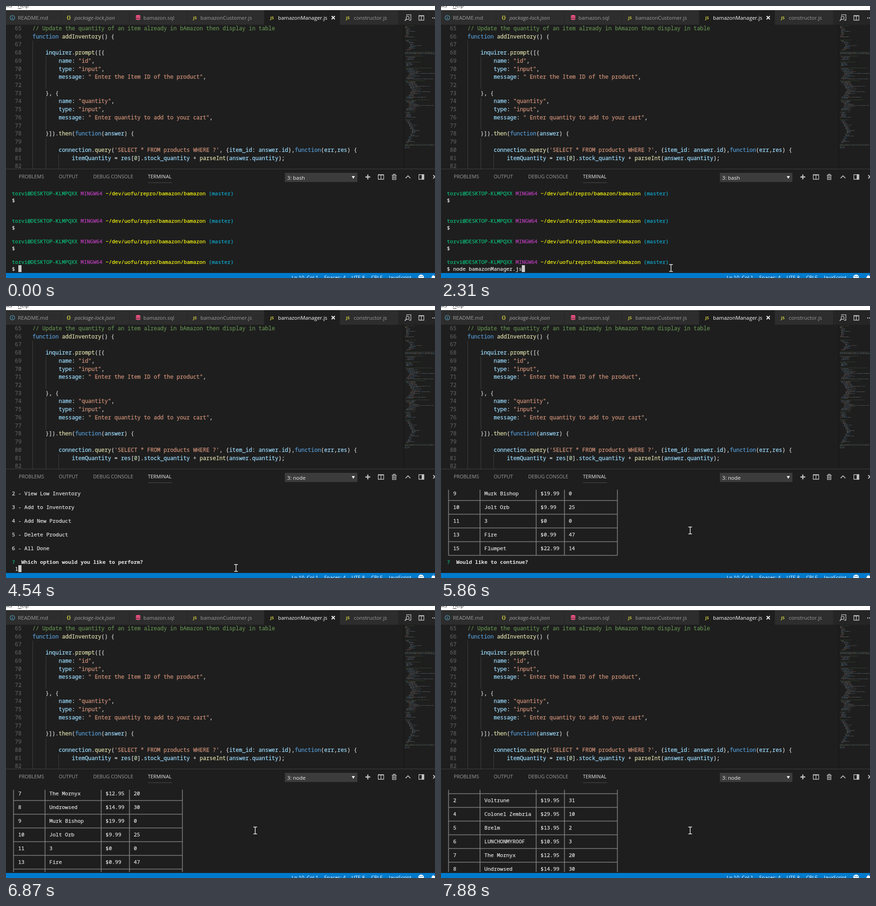
Recreate the animation shown at these times as an HTML page with a canvas. Size 940 by 595 pixels, loop 8 s.

```html
<!DOCTYPE html>
<html lang="en">
<head>
<meta charset="utf-8">
<title>Editor with terminal</title>
<style>
html, body { margin: 0; width: 940px; height: 595px; overflow: hidden; background: #1e1e1e; }
svg, canvas, pre, .view, .cursor { position: absolute; left: 0; top: 0; }
pre { margin: 0; font-family: "Noto Sans Mono", monospace; -webkit-text-stroke: .25px; }
.view { overflow: hidden; }
.ui text { font: 11.4px "Open Sans", sans-serif; fill: #9d9d9d; white-space: pre; }
.ui .on { fill: #fff; }
.ui .menu { font-size: 11px; fill: #333; }
.ui .js { font-size: 9px; font-weight: 700; fill: #cbcb41; }
.ui .head text { font-size: 10.7px; }
.ui .status text { font-size: 10.9px; fill: #fff; }
.ui .pick { font-size: 11.6px; fill: #f0f0f0; }
.line { fill: none; stroke: #c5c5c5; stroke-width: 1.3; }

#editor { top: 41px; width: 870px; height: 315px; }
#editor pre { top: -1px; font-size: 11.98px; line-height: 17.72px; color: #d4d4d4; }
#editor .nums { left: 19.6px; color: #5a5a5a; }
#editor .code { left: 58px; }
.com { color: #608b4e; } .str { color: #ce9178; } .key { color: #569cd6; }
.fn { color: #dcdcaa; } .num { color: #b5cea8; } .id { color: #9cdcfe; }

#term { left: 13px; top: 402px; width: 860px; height: 180px; font: 11.42px/15px "Noto Sans Mono", monospace; }
#term pre { color: #e0e0e0; font-size: 11.42px; line-height: 15px; }
#term b { color: #e5e5e5; -webkit-text-stroke: 0; }
.grn { color: #0dbc79; } .mag { color: #bc3fbc; } .yel { color: #f5f510; } .cyn { color: #11a8cd; }
.cursor { top: 165px; width: 7px; height: 15px; background: #ccc; }

/* one shared 8 s timeline with hard changes */
.cursor, #session, #cmd, #menu, #one, #table, #bash, #node, #arrow, #beam { animation: 8s step-end infinite; }
.cursor { animation-name: cursor; }
#session { animation-name: session; }
#cmd { animation-name: cmd; }
#menu { animation-name: menu; }
#one { animation-name: one; }
#table { animation-name: table; }
#bash { animation-name: bash; }
#node { animation-name: node; }
#arrow { animation-name: arrow; }
#beam { animation-name: beam; }
@keyframes cursor {
  0% { left: 2ch; opacity: 1; } 28.875% { left: 24ch; } 37.5% { left: 0ch; }
  48.125% { left: 1ch; } 56.75% { left: 2ch; } 60.75%, 100% { left: 2ch; opacity: 0; }
}
@keyframes session {
  0% { opacity: 1; transform: translateY(0); } 37.5% { transform: translateY(-15px); }
  47%, 100% { opacity: 0; transform: translateY(-15px); }
}
@keyframes cmd { 0% { opacity: 0; } 28.875%, 100% { opacity: 1; } }
@keyframes menu {
  0% { opacity: 0; transform: translateY(0); } 47% { opacity: 1; }
  48.125% { transform: translateY(-30px); } 60.75%, 100% { opacity: 0; transform: translateY(-30px); }
}
@keyframes one { 0% { opacity: 0; } 56.75%, 100% { opacity: 1; } }
@keyframes table {
  0% { opacity: 0; transform: translateY(-195px); }
  60.75% { opacity: 1; }
  79.125% { transform: translateY(-180px); }
  81% { transform: translateY(-165px); }
  82% { transform: translateY(-180px); }
  84% { transform: translateY(-165px); }
  84.9375% { transform: translateY(-150px); }
  85.875% { transform: translateY(-135px); }
  87.75% { transform: translateY(-120px); }
  91.625% { transform: translateY(-105px); }
  92.6875% { transform: translateY(-75px); }
  93.75% { transform: translateY(-45px); }
  95.625% { transform: translateY(-15px); }
  98.5%, 100% { opacity: 1; transform: translateY(0); }
}
@keyframes bash { 0% { opacity: 1; } 38.375%, 100% { opacity: 0; } }
@keyframes node { 0% { opacity: 0; } 38.375%, 100% { opacity: 1; } }
@keyframes arrow {
  0% { opacity: 0; transform: translate(546px, 591px); }
  4.5% { opacity: 1; transform: translate(546px, 591px); animation-timing-function: steps(7); }
  11.25% { opacity: 1; transform: translate(503px, 573px); }
  28.875%, 100% { opacity: 0; transform: translate(503px, 573px); }
}
@keyframes beam {
  0% { opacity: 0; transform: translate(504px, 573px); }
  28.875% { opacity: 1; }
  72.25% { transform: translate(533px, 517px); }
  73.25%, 100% { opacity: 1; transform: translate(546px, 491px); }
}
</style>
</head>
<body>
<svg class="ui" width="940" height="595">
  <path fill="#fff" d="M0 0h940v9H0z"/>
  <text class="menu" x="-3" y="3">sks</text><text class="menu" x="26" y="3">Help</text>
  <path stroke="#333" d="M26 5.5h8"/>
  <path fill="#252526" d="M0 9h940v32H0z"/>
  <path fill="#2d2d2d" d="M0 9h120v32H0zM121 9h149v32H121zM271 9h125v32H271zM397 9h168v32H397zM732 9h127v32H732z"/>
  <path fill="#1e1e1e" d="M566 9h165v32H566z"/>

  <circle cx="14" cy="25.5" r="5" fill="none" stroke="#519aba" stroke-width="1.2"/>
  <path stroke="#519aba" stroke-width="1.4" d="M14 22.4v1.4M14 24.8v3.6"/>
  <text x="26" y="30">README.md</text>
  <text x="133" y="29" style="fill:#cbcb41;font-weight:700">{}</text>
  <text x="150" y="30" style="font-style:italic">package-lock.json</text>
  <g fill="#f55385">
    <ellipse cx="289.5" cy="21.8" rx="5" ry="2"/>
    <path d="M284.5 23.2q5 2.6 10 0v2.5q-5 2.6-10 0zM284.5 27q5 2.6 10 0v2.3q-5 2.8-10 0z"/>
  </g>
  <text x="301" y="30">bamazon.sql</text>
  <text class="js" x="410" y="29">JS</text><text x="426" y="30">bamazonCustomer.js</text>
  <text class="js" x="579" y="29">JS</text><text class="on" x="596" y="30">bamazonManager.js</text>
  <path stroke="#fff" stroke-width="2" d="M713.5 22l7 7M720.5 22l-7 7"/>
  <text class="js" x="745" y="29">JS</text><text x="762" y="30">constructor.js</text>

  <g class="line">
    <path d="M878 21.500v-2.300h9.200V31h-4.200"/>
    <circle cx="880" cy="26" r="3.300"/><path stroke-width="1.8" d="M877.600 28.500l-3.800 3.900"/>
    <path d="M904.6 21h11v10h-11zM910.1 21v10M904.6 21.8h11"/>
  </g>
  <path fill="#c5c5c5" d="M934 25h2.2v2.2H934zM938 25h2v2.2h-2z"/>

  <path stroke="#404040" d="M58.5 76v280M87.5 111v71M87.5 200v71M87.5 289v67M115.5 324v32"/>
  <path fill="#191919" d="M870.5 41h2v315h-2z"/>
  <path fill="#414141" d="M0 356h940v1H0z"/>

  <g class="head">
    <text x="28" y="377">PROBLEMS</text><text x="115.5" y="377">OUTPUT</text>
    <text x="191" y="377">DEBUG CONSOLE</text><text x="311" y="377" style="fill:#e7e7e7">TERMINAL</text>
  </g>
  <path stroke="#4c4c4c" d="M311 386.5h53"/>
  <path fill="#3c3c3c" d="M611 365h159v20H611z"/>
  <text class="pick" id="bash" x="616" y="379.5">3: bash</text>
  <text class="pick" id="node" x="616" y="379.5">3: node</text>
  <path fill="#f0f0f0" d="M757.5 372h7l-3.5 6z"/>
  <g class="line">
    <path stroke-width="2.4" d="M787.5 374h10.6M792.8 368.7v10.6"/>
    <path d="M815.6 369h12v10h-12zM821.6 369v10M815.6 369.8h12"/>
    <path d="M845.4 370.4h10.4M848.6 370v-1.8h4V370M846.8 371v8.6h7.6V371M849.2 372v6M851.8 372v6"/>
    <path stroke-width="1.7" d="M875.6 376.6l5.2-5.2 5.2 5.2"/>
    <path d="M904.6 369h11v10h-11z"/><path fill="#c5c5c5" d="M911.5 369h4v10h-4z"/>
    <path stroke-width="2" d="M936 370l7.4 7.4M936 377.4l7.4-7.4"/>
  </g>

  <path fill="#007acc" d="M0 584h940v11H0z"/>
  <g class="status">
    <text x="626" y="598">Ln 10, Col 1</text><text x="697" y="598">Spaces: 4</text>
    <text x="757" y="598">UTF-8</text><text x="800" y="598">CRLF</text><text x="839" y="598">JavaScript</text>
  </g>
  <circle cx="909.5" cy="593.5" r="6" fill="#fff"/>
  <path fill="#007acc" d="M906.4 591h2v2h-2zM910.6 591h2v2h-2z"/>
  <path fill="#fff" d="M932 595q1-5 4.5-6q3.5 1 4.5 6z"/>
</svg>

<div class="view" id="editor"><pre class="nums"></pre><pre class="code"></pre></div>
<canvas id="map" width="68" height="275" style="left:872px;top:41px"></canvas>

<div class="view" id="term">
  <pre id="session"></pre>
  <pre id="menu">1 - View Products for Sale

2 - View Low Inventory

3 - Add to Inventory

4 - Add New Product

5 - Delete Product

6 - All Done

<span class="grn">?</span>  <b>Which option would you like to perform?</b>
 <span id="one">1</span></pre>
  <div id="table" class="view" style="overflow:visible">
    <svg width="400" height="345" style="overflow:visible"><path id="grid" fill="none" stroke="#7f7f7f" stroke-width="1.6"/></svg>
    <pre id="rows"></pre>
  </div>
  <div class="cursor"></div>
</div>

<svg width="940" height="595">
  <path id="arrow" fill="#fff" stroke="#000" stroke-width=".8" d="M.5 .5V14l3-2.9 2.2 5 2.2-1-2.2-4.7H10z"/>
  <g id="beam" fill="none">
    <path stroke="#000" stroke-width="3" d="M-4 -7.5h8M0-7.5v15M-4 7.5h8" opacity=".5"/>
    <path stroke="#fff" stroke-width="1.4" d="M-4 -7.5h3.5l.5 .5 .5-.5H4M0-7v14M-4 7.5h3.5l.5-.5 .5 .5H4"/>
  </g>
</svg>

<script>
const $ = s => document.querySelector(s);
const span = (cls, text) => `<span class="${cls}">${text}</span>`;

// editor
const source = `// Update the quantity of an item already in bAmazon then display in table
function addInventory() {

    inquirer.prompt([{
        name: "id",
        type: "input",
        message: " Enter the Item ID of the product",

    }, {
        name: "quantity",
        type: "input",
        message: " Enter quantity to add to your cart",

    }]).then(function(answer) {

        connection.query('SELECT * FROM products WHERE ?', {item_id: answer.id},function(err,res) {
            itemQuantity = res[0].stock_quantity + parseInt(answer.quantity);
`;
const kinds = ['com', 'str', 'key', 'fn', 'num', 'id'];
const token = /(\/\/.*)|("[^"]*"|'[^']*')|\b(function)\b|(\b\w+(?=\())|\b(\d+)\b|([A-Za-z_]\w*)/g;
$('.code').innerHTML = source.replace(token, (text, ...groups) =>
  span(kinds[groups.findIndex(g => g !== undefined)], text));
$('.nums').textContent = Array.from({ length: 18 }, (_, i) => 65 + i).join('\n');

// shell session
const prompt = [span('grn', 'torvi@DESKTOP-KLMPQXX'), span('mag', 'MINGW64'),
  span('yel', '~/dev/uofu/repro/bamazon/bamazon'), span('cyn', '(master)')].join(' ') + '\n$';
$('#session').innerHTML = [prompt, '', '', prompt, '', prompt, '',
  prompt + '<span id="cmd"> node bamazonManager.js</span>'].join('\n');

// product table
const items = [
  [2, 'Voltrune', '$19.95', 31], [4, 'Colonel Zembria', '$29.95', 10], [5, 'Brelm', '$13.95', 2],
  [6, 'LUNCHONMYROOF', '$10.95', 3], [7, 'The Mornyx', '$12.95', 20], [8, 'Undrowsed', '$14.99', 30],
  [9, 'Murk Bishop', '$19.99', 0], [10, 'Jolt Orb', '$9.99', 25], [11, '3', '$0', 0],
  [13, 'Fire', '$0.99', 47], [15, 'Flumpet', '$22.99', 14]
];
const row = ([id, name, price, stock]) =>
  '  ' + String(id).padEnd(10) + name.padEnd(18) + price.padEnd(9) + stock;
$('#rows').innerHTML = '\n' + items.map(row).join('\n\n') +
  `\n\n${span('grn', '?')}  <b>Would like to continue?</b>`;
let grid = '';
for (let i = 0; i <= items.length; i++) grid += `M3.5 ${i * 30 + 8.5}h370`;
for (const col of [0, 10, 28, 37, 54]) grid += `M${Math.round(col * 6.852 + 3) + .5} -15V338.5`;
$('#grid').setAttribute('d', grid);

// minimap: blocks of [top, rows, deepest indent, longest line]
const blocks = [[2, 13, 3, 20], [33, 12, 12, 26], [59, 3, 0, 66], [68, 5, 6, 40], [81, 5, 4, 34],
  [94, 13, 9, 60], [122, 20, 14, 44], [164, 12, 9, 54], [190, 7, 3, 24], [207, 26, 14, 18],
  [261, 2, 0, 66], [265, 3, 0, 10]];
const ctx = $('#map').getContext('2d');
let seed = 7;
const rand = () => (seed = seed * 16807 % 2147483647) / 2147483647;
const inks = ['#9cdcfe', '#d4d4d4', '#d4d4d4', '#ce9178', '#569cd6'];
ctx.globalAlpha = .36;
for (const [top, rows, deep, long] of blocks) {
  for (let i = 0; i < rows; i++) {
    const depth = Math.sin(Math.PI * i / rows);
    let x = 2 + Math.round(deep * depth / 3) * 3;
    const full = rows < 4 || i % 6 === 0;
    const end = Math.min(67, x + long * (full ? 1 : .2 + .3 * rand()));
    while (x < end) {
      const w = 1 + rand() * 4;
      ctx.fillStyle = i ? inks[Math.floor(rand() * inks.length)] : '#608b4e';
      ctx.fillRect(x, top + i * 2, Math.min(w, end - x), 1);
      x += w + 1;
    }
  }
}
</script>
</body>
</html>
```
